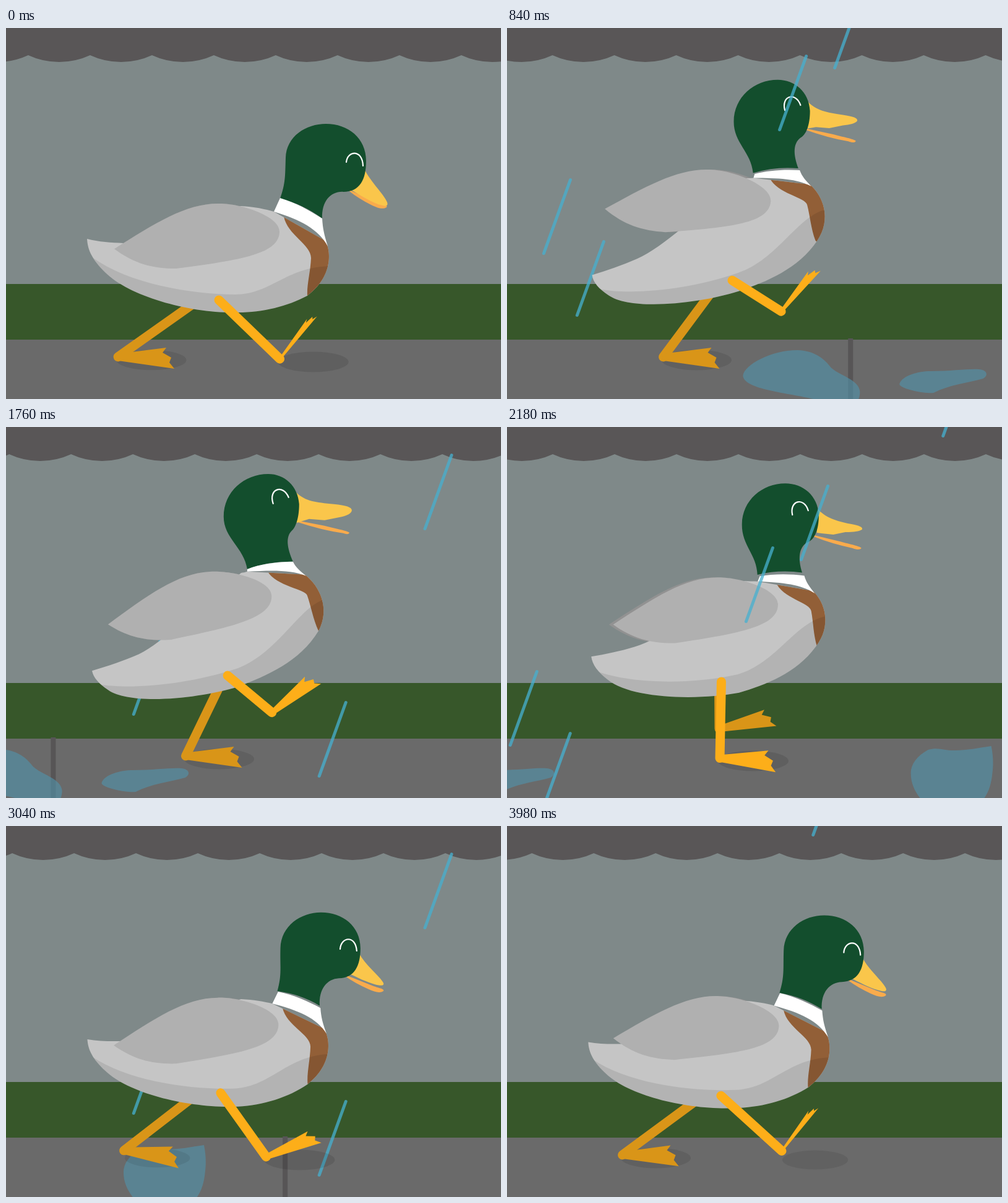
Animation, 800 px wide and 600 px high, one loop 4 s. Source, as an HTML page with a canvas:

```html
<!DOCTYPE html>
<html lang="en">
<head>
<meta charset="utf-8">
<title>Duck in the rain</title>
<style>
html, body { margin: 0; width: 100%; height: 100%; overflow: hidden; background: #7f8989; }
canvas { display: block; }
</style>
</head>
<body>
<canvas id="stage" width="800" height="600"></canvas>
<script>
const ctx = document.getElementById('stage').getContext('2d');
const LOOP = 4000, STEP = 1000;
const mod = (a, n) => ((a % n) + n) % n;
const clamp = v => Math.max(0, Math.min(1, v));
const lerp = (a, b, u) => a + (b - a) * u;

// Step cycle keys: time, lift, tail lag, sway, wing angle
const BODY = [
  [0, 0, 0, 0, 0], [40, .15, -4, -1, -1.4], [80, .31, -20, 1, -1], [260, 1, 0, 7, 0],
  [340, .77, 0, 11, 7.8], [480, .11, 3, 18, 2], [500, 0, 0, 19, 0], [540, .15, -5, 20, -1.4],
  [580, .31, -22, 20, -.7], [760, 1, 0, 0, -4.2], [840, .87, 13, -5, 3.2], [980, .11, 3, -2, 1.7]
];
// time, hip x, hip y, foot angle, foot width
const LEG = [
  [0, 344, 440, -53, .3], [40, 347, 432, -24, .75], [80, 338, 425, 0, 1], [260, 352, 405, 0, 1],
  [340, 341, 413, 0, 1], [500, 318, 435, 0, 1], [540, 316, 428, 6, 1], [580, 321, 418, 18, 1],
  [760, 358, 402, -39, .75], [840, 364, 408, -51, .45], [980, 346, 436, -53, .3]
];
// time, ankle x, ankle y
const NEAR = [
  [0, 443, 535], [40, 421, 535], [80, 397, 535], [260, 303, 536], [340, 261, 536], [500, 190, 535],
  [540, 200, 529], [580, 238, 521], [760, 429, 462], [840, 443, 458], [980, 444, 525]
];
const FAR = [
  [0, 181, 532], [40, 190, 525], [80, 228, 517], [260, 425, 470], [340, 461, 481], [480, 436, 528],
  [500, 425, 532], [540, 398, 532], [580, 375, 532], [760, 291, 532], [840, 253, 532], [980, 187, 532]
];

// Smooth cyclic interpolation through the keys
function pose(keys, time) {
  const t = mod(time, STEP), n = keys.length;
  const at = k => {
    const key = keys[mod(k, n)];
    return [key[0] + Math.floor(k / n) * STEP, ...key.slice(1)];
  };
  let i = n - 1;
  while (keys[i][0] > t) i--;
  const [a, b, c, d] = [i - 1, i, i + 1, i + 2].map(at);
  const h = c[0] - b[0], x = (t - b[0]) / h;
  return b.slice(1).map((v, j) => {
    const k = j + 1;
    const m0 = (c[k] - a[k]) / (c[0] - a[0]) * h, m1 = (d[k] - b[k]) / (d[0] - b[0]) * h;
    return v + x * (m0 + x * (3 * (c[k] - v) - 2 * m0 - m1 + x * (2 * (v - c[k]) + m0 + m1)));
  });
}

// Each shape: low pose, raised pose
const SHAPES = {
  body: [
    'M131 341C150 346 170 347 190 348C250 345 330 292 380 288C400 289 420 293 433 297L516 344C526 362 528 402 487 433C455 450 415 460 375 460C300 462 200 435 160 395C140 375 132 360 131 341Z',
    'M139 394C165 386 190 378 215 367C255 347 300 300 380 236C383 236 387 235 390 234L483 239C508 258 524 295 505 330C475 380 420 403 375 420C310 440 200 450 165 425C150 415 141 405 139 394Z'],
  shade: [
    'M120 356L138 370C200 415 300 430 370 431C430 430 450 388 522 385L560 385L560 480L120 480Z',
    'M120 410L150 416C200 424 290 418 375 390C440 365 475 290 515 279L560 270L560 480L120 480Z'],
  chest: [
    'M449 305C455 335 493 350 493 372C492 395 486 415 487 433L500 450L550 400L540 344L516 338C500 322 475 310 449 305Z',
    'M422 232C435 258 485 262 487 273C493 290 496 310 505 330L520 345L550 300L520 239L483 236C465 231 440 232 422 232Z'],
  collar: [
    'M443 275C470 283 490 295 511 308C512 325 514 333 520 353C505 325 475 310 433 297Z',
    'M390 230C410 222 440 218 464 218C468 227 475 233 485 241C460 231 430 232 390 234Z'],
  head: [
    'M443 276C452 250 451 240 452 210C453 175 485 155 517 155C553 155 582 178 582 215C582 245 572 265 545 265C525 264 510 280 511 308Q480 285 443 276Z',
    'M390 230C385 195 352 180 352 145C352 105 385 76 424 76C450 76 472 95 474 125C474 148 468 163 462 168C452 178 454 195 464 218Q425 217 390 230Z'],
  eye: ['M550 217C552 198 576 196 577 223', 'M432 124C424 100 448 92 457 114'],
  jaw: [
    'M555 262L600 282C610 286 618 286 615 290C609 294 600 291 590 286Q570 276 555 264Z',
    'M468 151L515 160C530 164 552 168 555 171C555 174 550 174 545 172Q510 167 468 153Z']
};

// Upper bill; the base slides across the cheek as the head turns
const billPath = (top, low, outline, turn) => {
  const [ax, ay] = top, [dx, dy] = low;
  return `M${ax} ${ay}${outline}L${dx} ${dy}L${dx - 14 * turn} ${dy - 7 * turn}L${ax - 18 * turn} ${ay + 3 * turn}Z`;
};
const billLow = turn => billPath([580, 230], [555, 262],
  'C590 250 610 268 616 282C618 288 614 289 608 287C592 283 575 272 560 263', turn);
const billUp = turn => billPath([469, 106], [460, 158],
  'C485 121 500 122 530 125C550 127 559 130 559 135C559 140 550 144 540 146C515 151 490 149 470 155', turn);

const WING = new Path2D('M-267 32C-200 -10 -150 -42 -97 -41C-60 -41 0 -20 0 4C0 40 -60 50 -167 64C-205 64 -235 56 -267 32Z');
const FOOT = new Path2D('M-2 -5L78 -15L72 -7L86 1L83 9L91 19L0 6Z');

function morph([low, high], u, lag = 0) {
  const ends = high.match(/-?[\d.]+/g);
  let i = 0, x;
  return new Path2D(low.replace(/-?[\d.]+/g, n => {
    const end = +ends[i];
    if (i++ % 2 === 0) return (x = lerp(+n, end, u ** 1.5)) + ' ';
    return lerp(+n, end, u) + lag * clamp((380 - x) / 250) + ' ';
  }));
}

function fill(path, color, dx = 0, dy = 0) {
  ctx.save();
  ctx.translate(dx, dy);
  ctx.fillStyle = color;
  ctx.fill(path);
  ctx.restore();
}

function line(x1, y1, x2, y2, width, color) {
  ctx.strokeStyle = color;
  ctx.lineWidth = width;
  ctx.lineCap = 'round';
  ctx.beginPath();
  ctx.moveTo(x1, y1);
  ctx.lineTo(x2, y2);
  ctx.stroke();
}

const PUDDLES = [
  // start x, speed, shape
  [820, .5215, 'M0 562C2 545 45 521 88 521C118 522 133 537 142 549C155 562 187 568 189 588C189 595 187 600 185 604L125 604C100 592 0 588 0 562Z'],
  [1073, .5215, 'M0 575C5 562 30 555 50 555C85 555 110 551 128 552C142 553 144 562 135 567C110 574 80 577 55 590C45 592 5 585 0 577Z'],
  [1826, .538, 'M0 560C0 545 10 532 28 522C45 517 55 524 72 523C90 523 110 519 130 516C134 535 133 550 132 558C130 580 125 592 116 604L18 604C8 592 0 578 0 560Z']
].map(([x, speed, d]) => ({ x, speed, path: new Path2D(d) }));

function scenery(t) {
  const box = (color, x, y, w, h) => { ctx.fillStyle = color; ctx.fillRect(x, y, w, h); };
  box('#7f8989', 0, 0, 800, 600);
  box('#37572a', 0, 414, 800, 90);
  box('#6a6a6a', 0, 504, 800, 96);
  box('#575556', 989 - .5205 * (t % 2000), 502, 8, 98);
  for (const p of PUDDLES) fill(p.path, 'rgba(81,148,174,.6)', p.x - p.speed * t);
  const x = mod(36 - .0743 * t, 100) - 100;
  fill(new Path2D(`M${x} 0V44${'a119 119 0 0 0 100 0'.repeat(10)}V0Z`), '#595657');
}

// x where the lower end meets the top edge, delay, last time, in front of the duck
const DROPS = [
  [281, 20, 2560], [191, 60, 2560], [500, 140, LOOP, true], [553, 180, LOOP, true],
  [710, 260, LOOP], [374, 300, LOOP], [736.5, 420, LOOP]
];

function rain(t, front) {
  for (const [x, delay, end, near = false] of DROPS) {
    if (near !== front || t < delay || t >= end) continue;
    const y = 12 + 2.5 * ((t - delay) % 640), bx = x - .361 * y;
    if (y < 740) line(bx + 43, y - 119, bx, y, 5, 'rgba(70,177,208,.75)');
  }
}

function shadow([x, y], cy) {
  const up = Math.max(0, 533 - y);
  if (up > 40) return;
  const r = 57 * (1 - up / 110);
  ctx.fillStyle = `rgba(0,0,0,${.1 * (1 - up / 40)})`;
  ctx.beginPath();
  ctx.ellipse(x + 54, cy, r, r * .29, 0, 0, 7);
  ctx.fill();
}

function leg(t, [x, y], color) {
  const [hx, hy, angle, width] = pose(LEG, t);
  line(hx, hy, x, y, 15, color);
  ctx.save();
  ctx.translate(x, y);
  ctx.rotate(angle * Math.PI / 180);
  ctx.scale(1, width);
  fill(FOOT, color);
  ctx.restore();
}

function wing(x, y, angle, color) {
  ctx.save();
  ctx.translate(x, y);
  ctx.rotate(angle * Math.PI / 180);
  fill(WING, color);
  ctx.restore();
}

function head(u, turn) {
  const bill = () => {
    fill(morph(SHAPES.jaw, u), '#f9ab4c', 5 * turn, 8 * turn);
    fill(morph([billLow(turn), billUp(turn)], u), '#fac64b', 6 * turn, 6 * turn);
  };
  const facing = turn > .25;
  if (!facing) bill();
  fill(morph(SHAPES.head, u), '#134e2d');
  if (facing) bill();
  ctx.save();
  ctx.translate(-16 * turn, 0);
  ctx.strokeStyle = '#fff';
  ctx.lineWidth = 2.2;
  ctx.stroke(morph(SHAPES.eye, u));
  ctx.restore();
}

function duck(t) {
  const [lift, lag, sway, flap] = pose(BODY, t);
  const u = Math.max(0, lift), headUp = u + .3 * u * (1 - u);
  const near = pose(NEAR, t), far = pose(FAR, t);
  const wx = lerp(442, 429, u ** 1.5) + sway, wy = lerp(325, 268, u);

  shadow(far, 537);
  shadow(near, 540);
  wing(wx - 1.6 * sway, wy, flap, '#929292');
  leg(t + 500, far, '#d99518');

  const body = morph(SHAPES.body, u, lag);
  fill(body, '#c5c5c5');
  ctx.save();
  ctx.clip(body);
  fill(morph(SHAPES.chest, u), '#925f37', .6 * sway);
  fill(morph(SHAPES.shade, u, lag), 'rgba(0,0,0,.09)');
  ctx.restore();

  head(headUp, clamp(sway / 20));
  fill(morph(SHAPES.collar, u), '#fff');
  wing(wx, wy, flap, '#b0b0b0');
  leg(t, near, '#fdae19');
}

function draw(now) {
  const t = mod(now, LOOP);
  scenery(t);
  rain(t, false);
  duck(t);
  rain(t, true);
  requestAnimationFrame(() => draw(performance.now()));
}
draw(performance.now());
</script>
</body>
</html>
```
